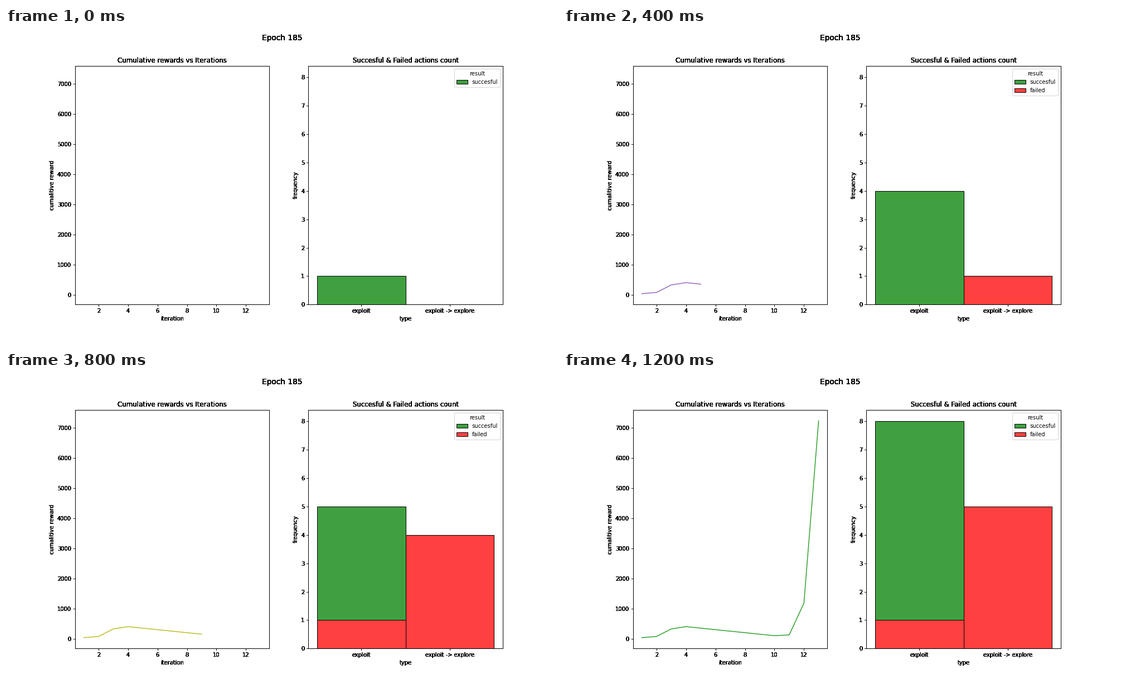
A matplotlib script that plays this animation: 990 px wide and 566 px high, repeating every 1300 ms.

```python
import matplotlib.pyplot as plt
import numpy as np
from matplotlib.animation import FuncAnimation
from matplotlib.colors import to_rgba
from matplotlib.patches import Patch

W, H = 990, 566
DPI = H / 8  # the figure is 8 inches tall
STEP_MS = 100

EXPLOIT, EXPLORE = 0, 1
# One (action, reward) pair per iteration; a negative reward is a failure.
ACTIONS = (
    [(EXPLOIT, r) for r in (35, 40, 250, 75)]
    + [(EXPLORE, -50), (EXPLOIT, -50)]
    + [(EXPLORE, -50)] * 4
    + [(EXPLOIT, r) for r in (25, 1050, 6050)]
)
ITERATIONS = np.arange(1, len(ACTIONS) + 1)
TOTALS = np.cumsum([reward for _, reward in ACTIONS])

GREEN, RED = to_rgba("green", 0.75), to_rgba("red", 0.75)

plt.rcdefaults()


def harden(image, dpi):
    """Make smoothed edges nearly solid black."""
    out = np.zeros_like(image)
    out[..., 3] = np.clip(4 * image[..., 3], 0, 1)
    return out, 0, 0


def style(ax, title, xlabel, ylabel):
    ax.set_title(title)
    ax.set_xlabel(xlabel)
    ax.set_ylabel(ylabel)
    for part in (ax.title, ax.xaxis, ax.yaxis, *ax.spines.values()):
        part.set_agg_filter(harden)


fig, (left, right) = plt.subplots(
    1, 2, figsize=(W / DPI, H / DPI), dpi=DPI, facecolor="white",
    gridspec_kw=dict(left=0.125, right=0.9, bottom=0.125, top=0.88, wspace=0.2),
)
fig.suptitle("Epoch 185", fontsize=14).set_agg_filter(harden)

style(left, "Cumulative rewards vs Iterations", "iteration", "cumalitive reward")
low, high = TOTALS.min(), TOTALS.max()
pad = 0.05 * (high - low)
left.set_xlim(0.4, 13.6)
left.set_ylim(low - pad, high + pad)
left.set_xticks(range(2, 13, 2))
left.set_yticks(range(0, 7001, 1000))
line, = left.plot([], [], lw=1.5)

style(right, "Succesful & Failed actions count", "type", "frequency")
right.set_xlim(-0.6, 1.6)
right.set_ylim(0, 8.4)
right.set_xticks([EXPLOIT, EXPLORE], ["exploit", "exploit -> explore"])
right.set_yticks(range(9))


def make_bars(color):
    return right.bar([EXPLOIT, EXPLORE], [0, 0], width=1,
                     facecolor=color, edgecolor="black", linewidth=1)


failed_bars, good_bars = make_bars(RED), make_bars(GREEN)
handles = [
    Patch(facecolor=color, edgecolor="black", linewidth=1, label=label)
    for color, label in ((GREEN, "succesful"), (RED, "failed"))
]


def set_bar(bar, base, height):
    bar.set_y(base)
    bar.set_height(height)
    bar.set_visible(height > 0)


def update(i):
    n = i + 1
    line.set_data(ITERATIONS[:n], TOTALS[:n])
    line.set_color(f"C{i % 10}")

    done = ACTIONS[:n]
    any_failed = False
    for kind in (EXPLOIT, EXPLORE):
        failed = sum(k == kind and r < 0 for k, r in done)
        good = sum(k == kind and r > 0 for k, r in done)
        set_bar(failed_bars[kind], 0, failed)
        set_bar(good_bars[kind], failed, good)
        any_failed = any_failed or failed > 0

    right.legend(handles=handles if any_failed else handles[:1],
                 title="result", loc="upper right")
    return []


anim = FuncAnimation(fig, update, frames=len(ACTIONS), interval=STEP_MS,
                     repeat=True, repeat_delay=0, blit=False)
plt.show()
```
